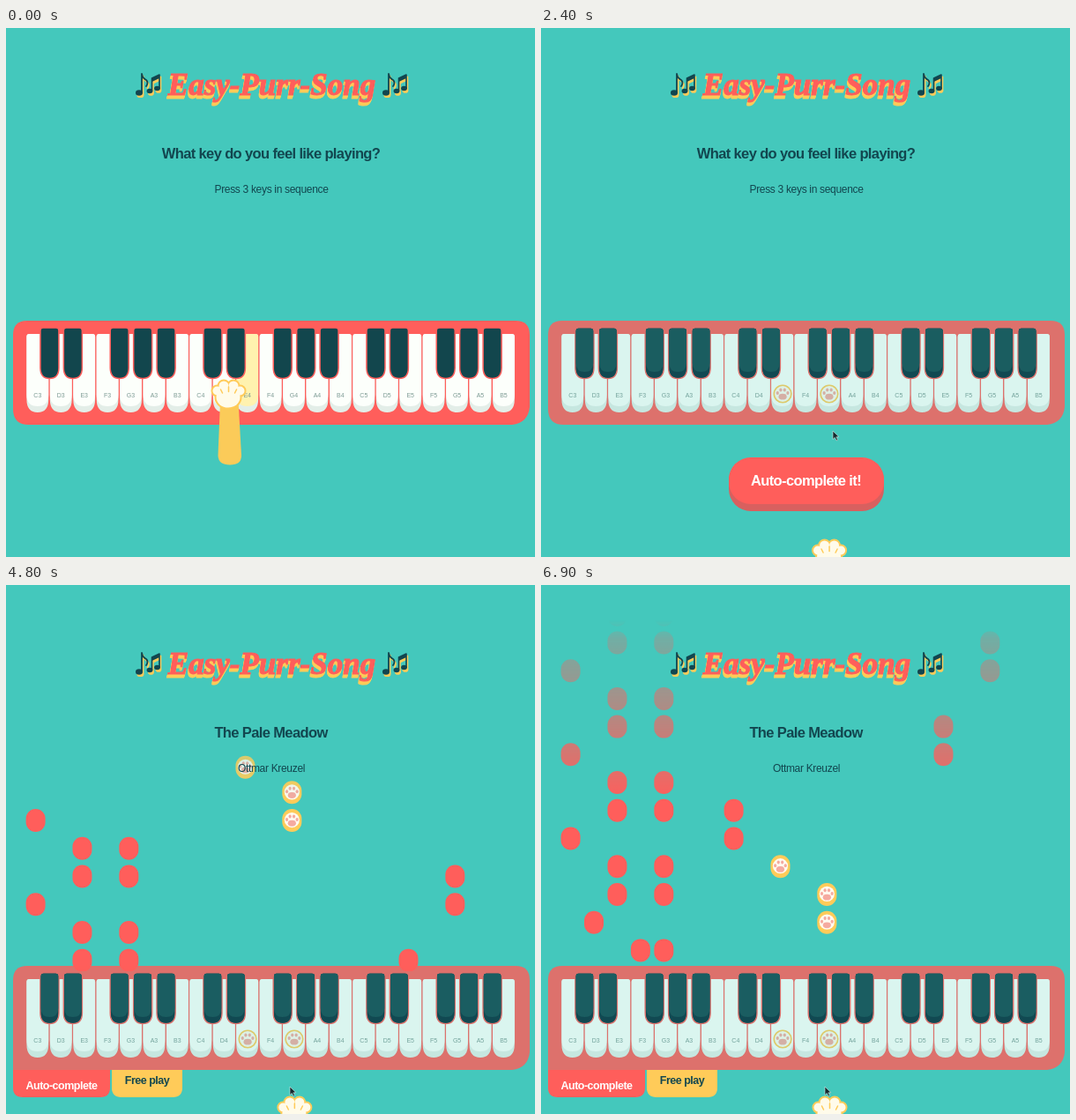
An HTML page for the animation above (7000 ms loop, 600 by 600 pixels).

```html
<!DOCTYPE html>
<html lang="en">
<head>
<meta charset="utf-8">
<title>Cat piano</title>
<style>
  html, body { margin: 0; width: 100%; height: 100%; overflow: hidden; background: #44c8bc; }
  svg { display: block; width: 100vw; height: 100vh; }
  text { font-family: "Liberation Sans", Arial, sans-serif; text-anchor: middle; fill: #12464f; }
  .head { font-size: 16.5px; font-weight: 700; letter-spacing: -.62px; }
  .sub { font-size: 12px; letter-spacing: -.32px; }
  .tab { font-size: 12.5px; font-weight: 700; letter-spacing: -.5px; }
  .label { font-size: 7px; fill: #7d9b94; }
  .title { font: italic 700 35px "Liberation Serif", "Times New Roman", serif; stroke-width: 1; }
  .light { fill: #fff; }
</style>
</head>
<body>
<svg viewBox="0 0 600 600">
  <defs>
    <linearGradient id="fade" gradientUnits="userSpaceOnUse" x1="0" y1="40" x2="0" y2="245">
      <stop offset="0" stop-color="#fff" stop-opacity="0"/>
      <stop offset=".1" stop-color="#fff" stop-opacity=".24"/>
      <stop offset="1" stop-color="#fff"/>
    </linearGradient>
    <mask id="mask" maskUnits="userSpaceOnUse" x="0" y="0" width="600" height="600">
      <rect id="roll" width="600" height="600" fill="url(#fade)"/>
    </mask>
    <g id="pads" fill="#f5aaa0">
      <ellipse cy="3.2" rx="4.6" ry="3.4"/>
      <ellipse cx="-5.8" cy="-1" rx="1.6" ry="2"/><ellipse cx="-2.2" cy="-4.6" rx="1.6" ry="2"/>
      <ellipse cx="2.2" cy="-4.6" rx="1.6" ry="2"/><ellipse cx="5.8" cy="-1" rx="1.6" ry="2"/>
    </g>
    <g id="stamp">
      <circle r="9.8" fill="#fffaf0" stroke="#ffcb59" stroke-width="1.6"/>
      <use href="#pads"/>
    </g>
    <g id="pawNote">
      <rect x="-11" y="-13" width="22" height="26" rx="11" fill="#ffcb59"/>
      <circle r="8.6" cy="-.5" fill="#fffaf0"/>
      <use href="#pads"/>
    </g>
    <rect id="redNote" x="-11" y="-13" width="22" height="26" rx="11" fill="#ff5e5b"/>
    <g id="music" stroke-linecap="round" stroke-linejoin="round">
      <ellipse cx="-10" cy="8.5" rx="4" ry="3.2" stroke="none"/>
      <path d="M-7 8V-13Q-6-8-2-6Q1-3-2 1" fill="none" stroke-width="1.8"/>
      <ellipse cx="2" cy="6.5" rx="3.4" ry="2.8" stroke="none"/>
      <ellipse cx="10.500" cy="3.500" rx="3.4" ry="2.8" stroke="none"/>
      <path d="M4.500 6V-8L13-12V3" fill="none" stroke-width="1.6"/>
      <path d="M4.500-8L13-12V-8L4.500-4Z" stroke="none"/>
    </g>
    <g id="toes">
      <circle cx="-12.500" cy="12.500" r="5"/><circle cx="-5" cy="7" r="5.500"/>
      <circle cx="6" cy="7" r="5.500"/><circle cx="13.500" cy="12.500" r="5"/>
      <ellipse cy="20" rx="13.500" ry="11.500"/>
    </g>
  </defs>

  <rect width="600" height="600" fill="#44c8bc"/>
  <g mask="url(#mask)" id="notes"></g>

  <g id="header">
    <g id="logo"></g>
    <text id="head" class="head" x="300.500" y="148"></text>
    <text id="sub" class="sub" x="301" y="186.500"></text>
  </g>

  <g id="piano">
    <g id="board"></g>
    <g id="tabs">
      <path d="M8 118H118V138Q118 149 107 149H19Q8 149 8 138Z" fill="#ff5e5b"/>
      <path d="M120 118H200V138Q200 149 189 149H131Q120 149 120 138Z" fill="#ffcb59"/>
      <text class="tab light" x="63" y="140">Auto-complete</text>
      <text class="tab" x="160" y="133.500">Free play</text>
    </g>
  </g>

  <g id="button">
    <rect x="213" y="488" width="176" height="60" rx="25" fill="#d8605f"/>
    <rect x="213" y="487" width="176" height="53" rx="25" fill="#ff5e5b"/>
    <text class="head light" x="300.500" y="519">Auto-complete it!</text>
  </g>

  <g id="hand">
    <path d="M-9 24L-11.500 86Q-11 96.500 2 96.500Q15 96.500 15 86L11.500 24Z" fill="#fbcb59"/>
    <use href="#toes" fill="#ffcb59" stroke="#ffcb59" stroke-width="4"/>
    <use href="#toes" fill="#fffbea"/>
    <path d="M-8.500 11L-6.500 15M.5 8V13.500M9.500 11L7.500 15" fill="none" stroke="#ffcb59" stroke-width="1.5" stroke-linecap="round"/>
  </g>
  <path id="cursor" d="M0 0V9.500L2.300 7.400L4 11L5.600 10.200L4 6.800H7Z" fill="#17292d" stroke="#d5eeea" stroke-width=".6"/>
</svg>

<script>
const NS = "http://www.w3.org/2000/svg";
const LOOP = 7000, STEP = 100;
const KEYS = 21, KEY_W = 26.43, LEFT = 23;
const OPEN = 2800;           // the composition starts
const E4 = 9, F4 = 10, G4 = 11;
const $ = id => document.getElementById(id);

function add(parent, tag, attrs, text) {
  const el = document.createElementNS(NS, tag);
  for (const name in attrs) el.setAttribute(name, attrs[name]);
  if (text) el.textContent = text;
  parent.appendChild(el);
  return el;
}
const move = (el, x, y) => el.setAttribute("transform", `translate(${x.toFixed(2)} ${y.toFixed(2)})`);
const show = (el, on) => el.setAttribute("visibility", on ? "visible" : "hidden");
const clamp = v => Math.max(0, Math.min(1, v));
const smooth = v => v * v * (3 - 2 * v);

// Value of a table of [time, value] rows, eased between rows
function track(rows, t) {
  let i = 0;
  while (i < rows.length - 2 && t >= rows[i + 1][0]) i++;
  const [t0, a] = rows[i], [t1, b] = rows[i + 1];
  return a + (b - a) * smooth(clamp((t - t0) / (t1 - t0)));
}

// CSS "ease": cubic-bezier(.25, .1, .25, 1)
function ease(p) {
  let lo = 0, hi = 1;
  for (let i = 0; i < 20; i++) {
    const s = (lo + hi) / 2;
    if (.75 * s * (1 - s) + s * s * s < p) lo = s; else hi = s;
  }
  return .3 * lo * (1 - lo) ** 2 + 3 * lo * lo * (1 - lo) + lo ** 3;
}

// Title with a stacked shadow
for (const d of [3.5, 2.5, 1.5, 0]) {
  const color = d ? "#ffcb59" : "#ff5e5b";
  add($("logo"), "text", { class: "title", x: 301.5 + d * -.3, y: 76 + d, fill: color, stroke: color, style: `fill:${color}` }, "Easy-Purr-Song");
}
for (const x of [161, 441]) {
  for (const [d, color] of [[2.4, "#ffcb59"], [0, "#12464f"]]) {
    add($("logo"), "use", { href: "#music", x: x + d * .6, y: 65 + d, fill: color, stroke: color });
  }
}

// Keyboard, with y = 0 at its top edge
const bodyPath = r => `M24 0H578Q594 0 594 16V98Q592 116 574 118H${8 + r}Q8 118 8 ${118 - r}V16Q8 0 24 0Z`;
const body = add($("board"), "path", { fill: "#ff5e5b" });
const keyPath = (x, w, top, bottom, r) =>
  `M${x} ${top + 3}q0-3 3-3h${w - 6}q3 0 3 3V${bottom - r}q0 ${r}-${w / 2} ${r}q-${w / 2} 0-${w / 2}-${r}Z`;
const faces = [];
for (let i = 0; i < KEYS; i++) {
  const x = LEFT + i * KEY_W + .4, w = KEY_W - 1.6;
  add($("board"), "path", { d: keyPath(x, w, 15, 104, 15), fill: "#e3eee8" });
  faces.push(add($("board"), "path", { d: keyPath(x, w, 15, 97, 13) }));
  add($("board"), "text", { class: "label", x: x + w / 2, y: 87 }, "CDEFGAB"[i % 7] + (3 + Math.floor(i / 7)));
}
const strips = [];
for (let i = 1; i < KEYS; i++) {
  if ([0, 3].includes(i % 7)) continue;
  const x = LEFT + i * KEY_W - 10.5;
  add($("board"), "path", { d: keyPath(x, 21, 8, 65.5, 12), fill: "#12464d", stroke: "#ff5e5b", "stroke-width": 1.5 });
  const strip = add($("board"), "g", {});
  add(strip, "path", { d: keyPath(x + .7, 19.6, 8.7, 64.8, 12), fill: "#072e3b" });
  add(strip, "path", { d: keyPath(x + .7, 19.6, 8.7, 58, 10), fill: "#12464d" });
  strips.push(strip);
}
const stampAt = key => add($("board"), "use", { href: "#stamp", x: LEFT + (key + .5) * KEY_W, y: 83 });
const stamps = [[stampAt(E4), 400], [stampAt(G4), 1100]];

// Piano roll: waltz bass in three, melody on top
const notes = [];
function note(row, key, paw) {
  notes.push({ row, x: LEFT + key * KEY_W + 10.6, el: add($("notes"), "use", { href: paw ? "#pawNote" : "#redNote" }) });
}
for (let row = 2; row < 16; row++) {
  const low = row < 14 ? [0, 2, 4] : [1, 3, 4];
  if (row % 3 === 2) note(row, low[0]);
  else { note(row, low[1]); note(row, low[2]); }
}
for (const [row, key] of [[4, 18], [7, 16], [10, 7]]) { note(row, key); note(row + 1, key); }
for (const [row, key] of [[.1, E4], [1, G4], [2, G4], [12, E4], [13, G4], [14, G4]]) note(row, key, true);

const HAND_X = [[0, 252], [300, 273], [800, 273], [1050, 326.5], [7000, 327]];
const HAND_Y = [[0, 399], [300, 399], [400, 402], [500, 399], [1000, 399], [1100, 402], [1200, 399],
                [1400, 399], [1500, 402], [1600, 399], [2000, 580], [7000, 580]];
const CURSOR_X = [[1700, 327], [2400, 331], [2600, 322], [7000, 322]];
const CURSOR_Y = [[1700, 430], [2400, 457], [2600, 512], [3000, 512], [3500, 569], [7000, 569]];

function draw(t) {
  const open = t >= OPEN;
  const top = open ? 357 + 75 * ease(clamp((t - OPEN) / 1000)) : 332;
  const dim = clamp((t - 1500) / 300);

  move($("header"), 0, open ? 25 : 0);
  $("head").textContent = open ? "The Pale Meadow" : "What key do you feel like playing?";
  $("sub").textContent = open ? "Ottmar Kreuzel" : "Press 3 keys in sequence";

  move($("piano"), 0, top);
  $("board").setAttribute("opacity", 1 - .18 * dim);
  body.setAttribute("d", bodyPath(open ? 0 : 18));
  strips.forEach(s => s.setAttribute("opacity", dim));
  const hover = t < 700 ? E4 : t < 900 ? F4 : t < 1600 ? G4 : -1;
  faces.forEach((f, i) => f.setAttribute("fill", i === hover ? "#fff2af" : "#fcfffb"));
  stamps.forEach(([el, from]) => show(el, t >= from));
  show($("tabs"), open);
  show($("button"), t >= 1800 && !open);

  $("roll").setAttribute("height", top + 6);
  const rise = 178.7 - .1262 * (t - 5500) + (top - 432) * 1.125;
  for (const n of notes) {
    const y = rise + 31.72 * (n.row - 2);
    show(n.el, open && y > -20 && y < top + 20);
    move(n.el, n.x, y);
  }

  move($("hand"), track(HAND_X, t), track(HAND_Y, t));
  show($("cursor"), t >= 1700);
  move($("cursor"), track(CURSOR_X, t), track(CURSOR_Y, t));
}

const start = performance.now();
function tick() {
  const t = (performance.now() - start) % LOOP;
  draw(Math.floor(t / STEP) * STEP);
  requestAnimationFrame(tick);
}
tick();
</script>
</body>
</html>
```
